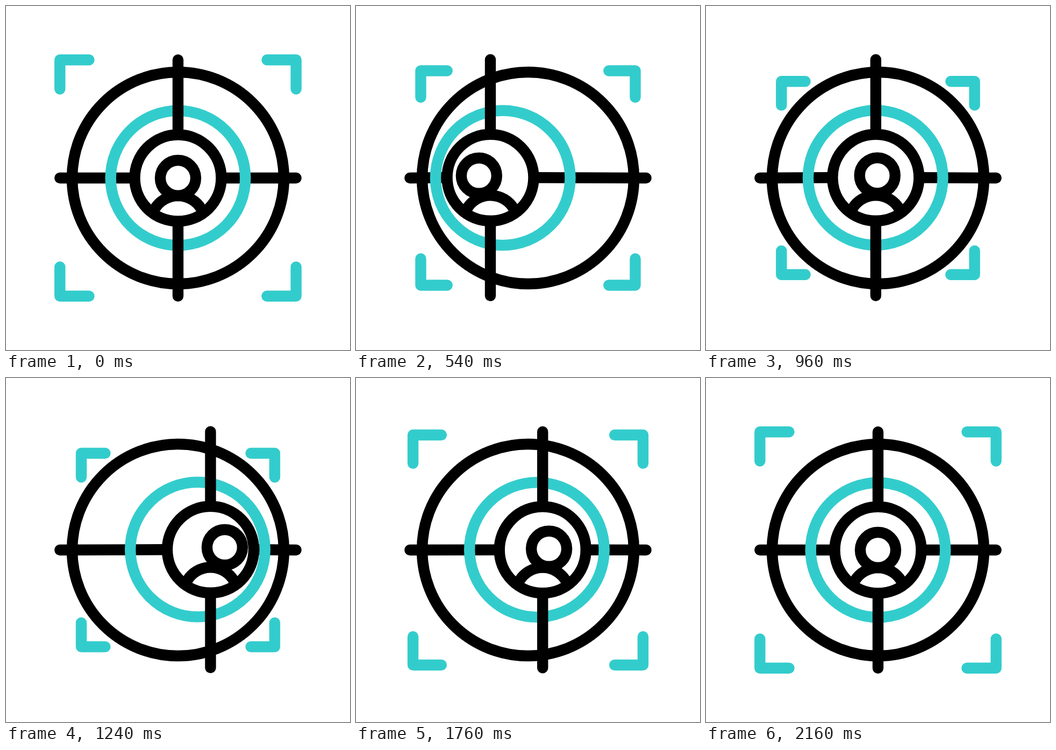
Write an HTML page that moves like this. It is 640 px wide and 640 px high and loops after 2.4 s.

```html
<!DOCTYPE html>
<html lang="en">
<head>
<meta charset="utf-8">
<title>Target audience</title>
<style>
  html, body { margin: 0; width: 100%; height: 100%; overflow: hidden; background: #fff; }
  svg { display: block; width: 100vw; height: 100vh; }
  svg * { fill: none; stroke: #000; stroke-width: 20.4; stroke-linecap: round; stroke-linejoin: round; }
  svg .accent { stroke: #33cccc; }
</style>
</head>
<body>
<svg viewBox="0 0 640 640">
  <circle cx="320" cy="320" r="197"/>
  <path id="bars"/>
  <circle id="halo" class="accent" cx="320" cy="320" r="125.3"/>
  <g id="lens">
    <path d="M320 100.3V236M320 404V539.7"/>
    <circle cx="320" cy="320" r="80.5"/>
    <path d="M277 377A50.5 50.5 0 0 1 363 377"/>
  </g>
  <circle id="head" cx="320" cy="320" r="33"/>
  <path id="corners" class="accent"/>
</svg>
<script>
const LOOP = 2400, STEP = 20, END = 2160;
const CENTER = 320, REACH = 219.7;
const [bars, halo, lens, head, corners] =
  ["bars", "halo", "lens", "head", "corners"].map(id => document.getElementById(id));

// Offsets at rest, far left, far right and rest again
const SWING = [0, 580, 1340, END];
const lensPath = [[0, 0], [-70.2, -0.7], [61.9, -0.7], [0, 0]];
const haloPath = [[0, 0], [-46.9, -0.2], [37.4, -0.9], [0, 0]];
const headPath = [[0, 0], [-91.4, -4.2], [88.9, -5], [0, 0]];

// cubic-bezier(.8, 0, .2, 1)
function ease(x) {
  let lo = 0, hi = 1;
  for (let i = 0; i < 30; i++) {
    const s = (lo + hi) / 2, r = 1 - s;
    if (2.4 * s * r * r + 0.6 * s * s * r + s ** 3 < x) lo = s; else hi = s;
  }
  return lo * lo * (3 - 2 * lo);
}

function offsetAt(path, t) {
  const i = t < SWING[1] ? 0 : t < SWING[2] ? 1 : 2;
  const k = ease((t - SWING[i]) / (SWING[i + 1] - SWING[i]));
  return path[i].map((from, axis) => from + (path[i + 1][axis] - from) * k);
}

const move = (el, [x, y]) => el.setAttribute("transform", `translate(${x} ${y})`);

function cornerPath(half) {
  const arm = 54.2 * half / REACH;
  return [[-1, -1], [1, -1], [1, 1], [-1, 1]].map(([sx, sy]) => {
    const x = CENTER + sx * half, y = CENTER + sy * half;
    return `M${x} ${y - sy * arm}V${y}H${x - sx * arm}`;
  }).join("");
}

function draw(t) {
  const [dx, dy] = offsetAt(lensPath, t);
  move(lens, [dx, dy]);
  move(halo, offsetAt(haloPath, t));
  move(head, offsetAt(headPath, t));

  const y = CENTER + dy, x = CENTER + dx;
  bars.setAttribute("d", `M100.3 320L${x - 84} ${y}M${x + 84} ${y}L539.7 320`);

  const squeeze = ease(1 - Math.abs(t / (END / 2) - 1));
  corners.setAttribute("d", cornerPath(REACH - 40.3 * squeeze));
}

const start = performance.now();
function tick() {
  const t = (performance.now() - start) % LOOP;
  draw(Math.min(END, Math.floor(t / STEP) * STEP));
  requestAnimationFrame(tick);
}
tick();
</script>
</body>
</html>
```
